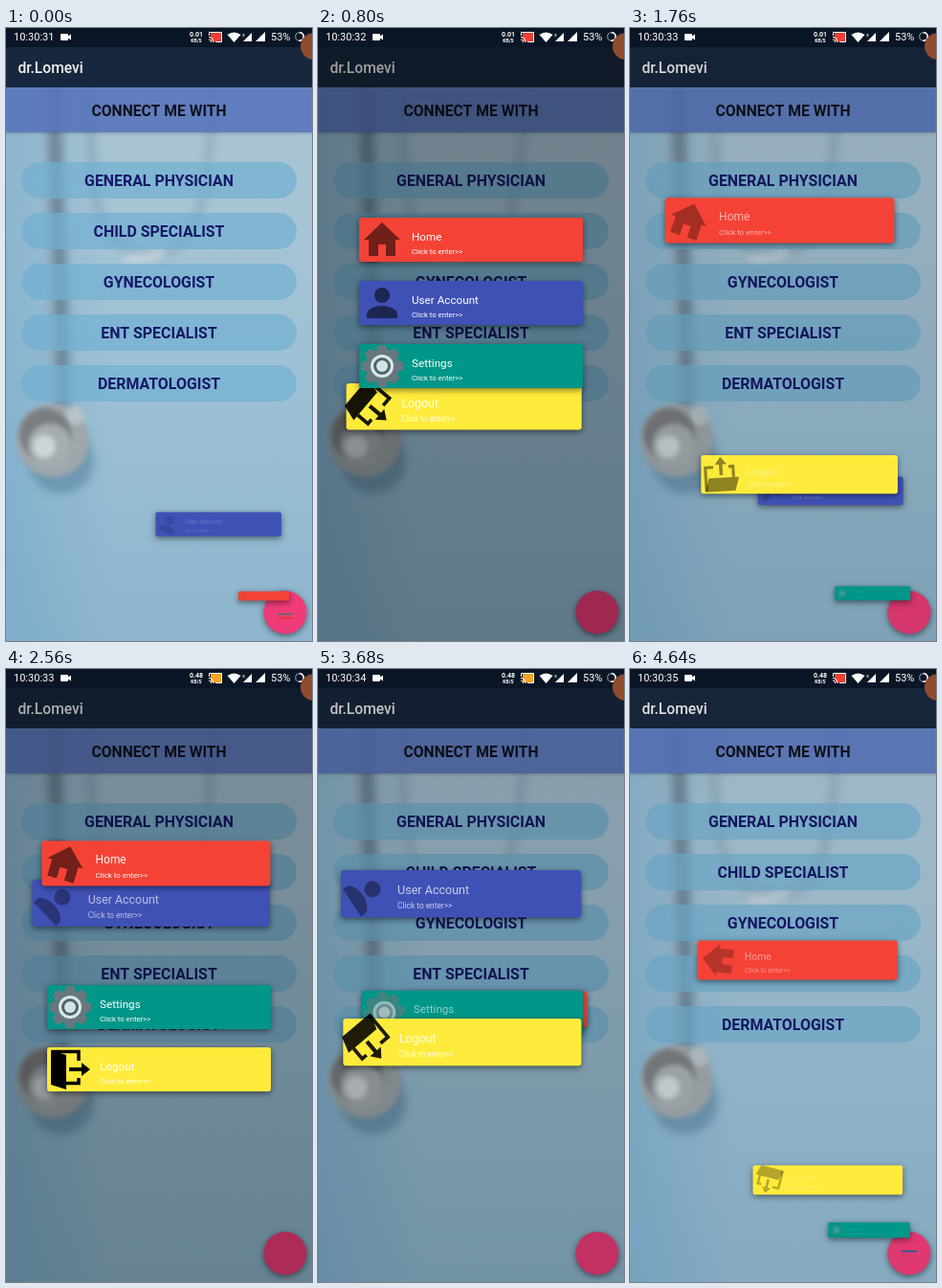
Recreate the animation shown at these times as an HTML page with a canvas. Size 320 by 640 pixels, loop 4800 ms.

```html
<!DOCTYPE html>
<html lang="en">
<head>
<meta charset="utf-8">
<title>Boom menu</title>
<style>
html, body { margin: 0; width: 100%; height: 100%; overflow: hidden; background: #9cc0d6; }
canvas { display: block; width: 320px; height: 640px; }
</style>
</head>
<body>
<canvas id="stage" width="320" height="640"></canvas>
<script>
const LOOP = 4800, STEP = 160;
const DURATION = 146, SHOW_DELAY = DURATION * 0.163, HIDE_DELAY = DURATION / 3;
const CARD = { w: 234, h: 46 }, FAB = { x: 292, y: 610 }, PIECE = { w: 16, h: 2 };
const FONT = 'Roboto, sans-serif';

// Each toggle: start time and launch order of the cards (0 = Home ... 3 = Logout).
// Even entries open the menu, odd entries close it.
const TOGGLES = [
  [-33.5, '1032'], [273, '2310'], [595, '0213'], [845, '1320'],
  [1145, '2013'], [1371, '0321'], [1671.5, '0312'], [1940, '2130'],
  [2260, '0132'], [2507, '1023'], [2850, '3201'], [3180, '0312'],
  [3551, '3120'], [3770, '1203'], [4062, '0231'], [4281, '2310'],
  [4573.5, '0321']
];

const stage = document.getElementById('stage');
let ctx = stage.getContext('2d');

const clamp = v => Math.max(0, Math.min(1, v));
const curve = (a, b) => s => 3 * (1 - s) ** 2 * s * a + 3 * (1 - s) * s * s * b + s ** 3;
const outBack = curve(0.885, 1.275), inBack = curve(-0.28, 0.045);

function rect(x, y, w, h, color, radius = 0) {
  ctx.fillStyle = color;
  ctx.beginPath();
  ctx.roundRect(x, y, w, h, radius);
  ctx.fill();
}

function disc(x, y, r, color) {
  ctx.fillStyle = color;
  ctx.beginPath();
  ctx.arc(x, y, r, 0, 7);
  ctx.fill();
}

function shape(d, color) {
  ctx.fillStyle = color;
  ctx.fill(new Path2D(d));
}

function line(d, color, width) {
  ctx.strokeStyle = color;
  ctx.lineWidth = width;
  ctx.stroke(new Path2D(d));
}

function text(str, x, y, size, color, weight = 400, align = 'left') {
  ctx.font = `${weight} ${size}px ${FONT}`;
  ctx.textAlign = align;
  ctx.textBaseline = 'alphabetic';
  ctx.fillStyle = color;
  ctx.fillText(str, x, y);
}

function shadow(color, blur, dy) {
  ctx.shadowColor = color;
  ctx.shadowBlur = blur;
  ctx.shadowOffsetY = dy;
}

function withState(draw) {
  ctx.save();
  draw();
  ctx.restore();
}

function homeIcon() {
  shape('M0-18L19 0H14V17H4V5H-4V17H-14V0H-19Z', 'rgba(0,0,0,.54)');
}

function userIcon() {
  shape('M8-8A8 8 0 1 1-8-8A8 8 0 1 1 8-8ZM-16 16V12C-16 6-6 3 0 3S16 6 16 12V16Z', 'rgba(0,0,0,.54)');
}

function gearIcon() {
  for (let i = 0; i < 8; i++) {
    withState(() => {
      ctx.rotate(i * Math.PI / 4);
      shape('M-6-16L-4-22H4L6-16Z', '#66787d');
    });
  }
  disc(0, 0, 17.5, '#66787d');
  disc(0, 0, 12, '#dbe8e8');
  disc(0, 0, 9, '#4b666d');
  disc(0, 0, 6, '#d3e3e3');
}

function logoutIcon() {
  shape('M-20-20L-4-15V21L-20 16Z', '#000');
  line('M-19-18.5H9V-9M9 9V14.5H-4', '#000', 3.5);
  shape('M-1-2H12V-7L21 0L12 7V2H-1Z', '#000');
}

const CARDS = [
  { label: 'Home', color: '#f44336', y: 221, icon: homeIcon, piece: '#f44336' },
  { label: 'User Account', color: '#3f51b5', y: 287, icon: userIcon, piece: '#3f5890' },
  { label: 'Settings', color: '#009688', y: 353, icon: gearIcon, piece: '#6f6078' },
  { label: 'Logout', color: '#ffeb3b', y: 418, icon: logoutIcon, piece: '#e0393c' }
].map((card, i) => ({ ...card, startY: 604 + i * 4 }));

function drawBackdrop() {
  const sky = ctx.createLinearGradient(0, 62, 0, 640);
  sky.addColorStop(0, '#b4d0e1');
  sky.addColorStop(0.25, '#b2d1e3');
  sky.addColorStop(0.6, '#a5cce2');
  sky.addColorStop(1, '#97c1da');
  rect(0, 0, 320, 640, sky);
  const edge = ctx.createLinearGradient(0, 0, 110, 0);
  edge.addColorStop(0, 'rgba(115,175,215,.45)');
  edge.addColorStop(1, 'rgba(115,175,215,0)');
  rect(0, 62, 110, 578, edge);

  withState(() => {
    ctx.filter = 'blur(4px)';
    line('M88 50C88 170 90 230 145 236S212 190 217 50', 'rgba(130,160,182,.42)', 9);
    line('M125 240C140 243 152 240 165 234', 'rgba(238,244,246,.8)', 7);
    line('M49 45C50 180 58 270 58 395', 'rgba(108,134,154,.78)', 18);
    line('M40 45C41 182 49 270 49 390', 'rgba(195,215,226,.45)', 5);
    disc(58, 452, 34, 'rgba(85,130,160,.5)');
    ctx.filter = 'blur(2.5px)';
    disc(49, 431, 38, '#a9b2b6');
    disc(72, 405, 10, '#c3ced3');
    disc(41, 424, 27, '#838689');
    disc(46, 436, 23, '#b0b8bc');
    disc(40, 437, 12, '#dbe3e6');
  });

  withState(() => {
    shadow('rgba(0,0,0,.25)', 3, 1);
    rect(0, 62, 320, 47, 'rgba(96,128,208,.86)');
  });
  text('CONNECT ME WITH', 160, 92, 15.7, '#10131f', 700, 'center');
  ['GENERAL PHYSICIAN', 'CHILD SPECIALIST', 'GYNECOLOGIST', 'ENT SPECIALIST', 'DERMATOLOGIST']
    .forEach((label, i) => {
      const y = 159 + i * 53;
      rect(16, y - 19, 288, 38, 'rgba(120,188,224,.7)', 19);
      text(label, 160, y + 5.5, 15.9, '#171a70', 700, 'center');
    });

  rect(0, 0, 320, 62, '#192a42');
  text('dr.Lomevi', 12.5, 46.5, 15.6, '#fff', 500);
  withState(() => {
    shadow('rgba(0,0,0,.5)', 6, 2);
    disc(FAB.x, FAB.y, 22.5, '#ff4081');
  });
}

function drawStatusBar(t, step) {
  rect(0, 0, 320, 20, '#0a1626');
  text('10:30:' + (31 + Math.floor((t + 280) / 1000)), 8, 13, 11, '#fff');
  rect(57, 6, 8, 7, '#fff', 1);
  shape('M64 9L68 6.5V12.5L64 10Z', '#fff');
  text(t < 2080 ? '0.01' : '0.48', 199, 9, 7, '#fff', 700, 'center');
  text('KB/S', 199, 15, 5, '#fff', 700, 'center');

  rect(214, 5, 11, 9, step % 7 === 2 ? '#f5a524' : '#ef4034');
  line('M212.5 8V4.5H225.5V14.5H219', '#fff', 1);
  line('M212 9.5A5 5 0 0 1 217 15M212 12A2.5 2.5 0 0 1 214.5 15', '#fff', 1);

  shape('M231.5 7Q238.5 2 245.5 7L238.5 15Z', '#fff');
  shape('M257 5V14H248Z', '#fff');
  text('x', 247, 9, 6, '#fff');
  shape('M271 4V14H261Z', '#fff');
  text('53%', 277, 13, 11, '#fff');
  ctx.strokeStyle = '#66707f';
  ctx.lineWidth = 1.6;
  ctx.beginPath();
  ctx.arc(307, 9, 4.3, 0, 7);
  ctx.stroke();
  ctx.strokeStyle = '#fff';
  ctx.beginPath();
  ctx.arc(307, 9, 4.3, -Math.PI / 2, Math.PI * 0.56);
  ctx.stroke();
  disc(322, 19, 14, '#904b2e');
}

// u runs from 0 (inside the round button) to 1 (at rest); x is linear, y follows a throw parabola.
function drawCard(card, u, alpha) {
  const grow = (from, to) => (from + (to - from) * u) / to;
  withState(() => {
    ctx.translate(FAB.x + (160 - FAB.x) * u, card.startY + (card.y - card.startY) * u * u);
    ctx.scale(grow(PIECE.w, CARD.w), grow(PIECE.h, CARD.h));
    withState(() => {
      shadow('rgba(0,0,0,.5)', 6, 2);
      rect(-CARD.w / 2, -CARD.h / 2, CARD.w, CARD.h, card.color, 3);
    });
    ctx.globalAlpha = alpha;
    text(card.label, -62, 0.5, 11.7, '#fff');
    text('Click to enter>>', -62, 14.5, 7.78, '#fff');
    ctx.translate(-93, 0);
    ctx.rotate(4 * Math.PI * u);
    card.icon();
  });
}

function drawMenu(t) {
  const current = TOGGLES.findLastIndex(([start]) => start <= t);
  const [start, order] = TOGGLES[current];
  const opening = current % 2 === 0;
  const delay = opening ? SHOW_DELAY : HIDE_DELAY;
  const elapsed = t - start;
  const progress = clamp(elapsed / (DURATION + 3 * delay));
  rect(0, 20, 320, 620, `rgba(0,0,0,${0.4 * (opening ? progress : 1 - progress)})`);

  const states = CARDS.map((card, i) => {
    const s = clamp((elapsed - order.indexOf(i) * delay) / DURATION);
    return opening
      ? { card, u: outBack(s), alpha: s }
      : { card, u: 1 - inBack(s), alpha: 1 - s };
  });
  for (const { card, alpha } of states) {
    if (alpha === 0) rect(FAB.x - PIECE.w / 2, card.startY - 1, PIECE.w, PIECE.h, card.piece);
  }

  // Cards launched first lie on top, also while closing.
  const stacking = TOGGLES[opening ? current : current - 1][1];
  for (const i of [...stacking].reverse()) {
    const { card, u, alpha } = states[i];
    if (alpha > 0) drawCard(card, u, alpha);
  }
}

function makeBackdrop() {
  const layer = document.createElement('canvas');
  layer.width = 320;
  layer.height = 640;
  const main = ctx;
  ctx = layer.getContext('2d');
  drawBackdrop();
  ctx = main;
  return layer;
}

const backdrop = makeBackdrop();
const origin = performance.now();

function render(now) {
  const step = Math.floor((Math.max(0, now - origin) % LOOP) / STEP);
  const t = step * STEP;
  ctx.drawImage(backdrop, 0, 0);
  drawMenu(t);
  drawStatusBar(t, step);
  requestAnimationFrame(render);
}
render(origin);
</script>
</body>
</html>
```
